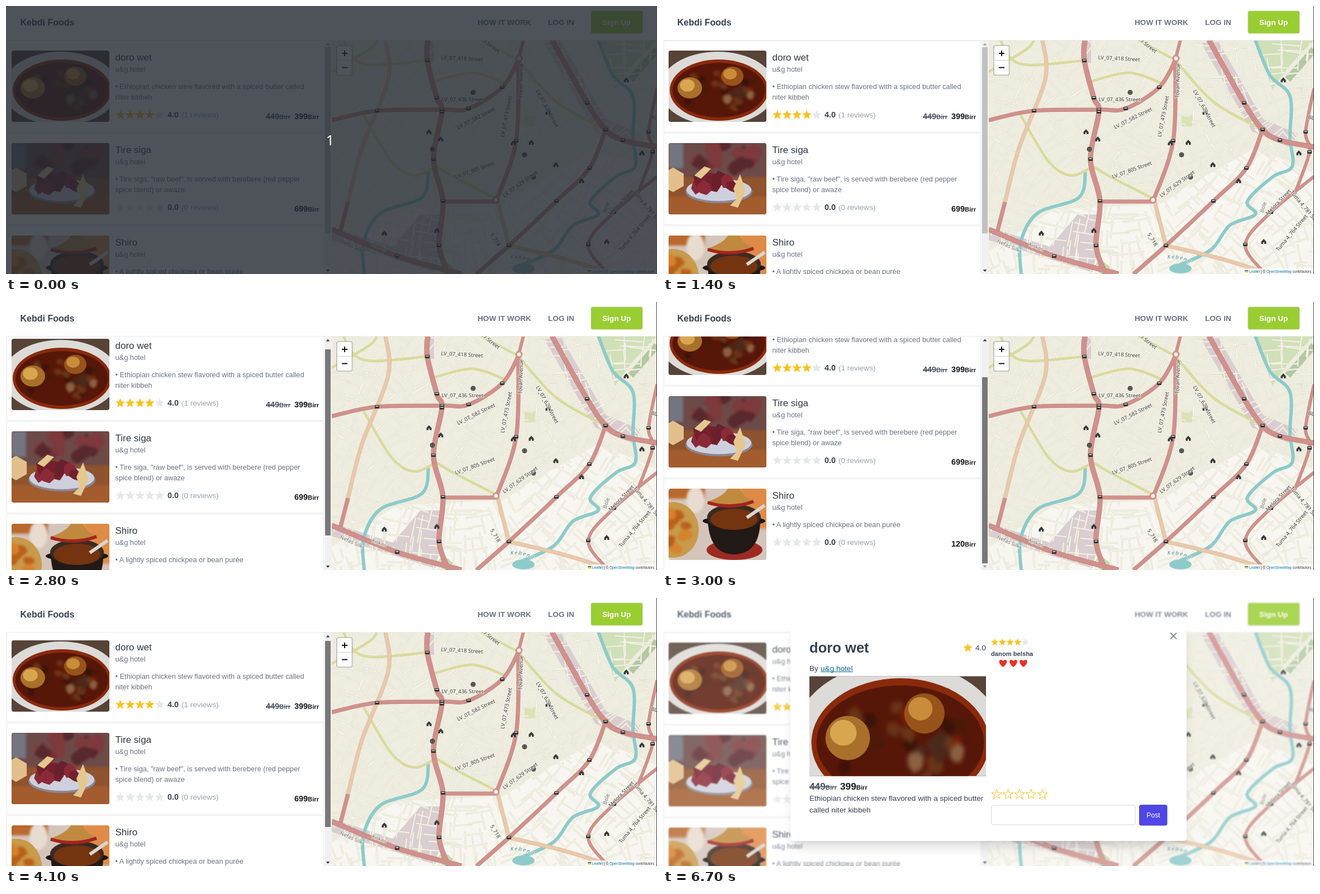
These frames come from a looping animation (1165 px wide and 481 px high, 8 s). An HTML page:

```html
<!DOCTYPE html>
<html lang="en">
<head>
<meta charset="utf-8">
<title>Food finder</title>
<style>
  html, body { margin: 0; width: 100%; height: 100%; overflow: hidden; background: #fff; }
  #stage { position: relative; width: 1165px; height: 481px; overflow: hidden; }
  #stage > * { position: absolute; left: 0; top: 0; width: 1165px; height: 481px; }
  svg { display: block; font-family: "Liberation Sans", Arial, sans-serif; }
  .map text, #dim text { font-family: "Noto Sans", sans-serif; }
  .map .credit { font-family: "Liberation Sans", Arial, sans-serif; }
  .soft { filter: blur(2px); }
  .raised { filter: drop-shadow(0 0 1.5px rgba(0, 0, 0, .2)); }
  #veil { background: rgba(255, 255, 255, .17); backdrop-filter: blur(1px); }
  #dim { background: rgba(34, 40, 49, .8); }
  #stage > #edge { left: 1164px; width: 1px; background: #45464a; }
  #stage > #panel { left: 228px; top: 45px; width: 709px; height: 391px; border-radius: 6px;
    background: #fff; box-shadow: 0 16px 20px -4px rgba(0, 0, 0, .12), 0 6px 8px -4px rgba(0, 0, 0, .08); }
</style>
</head>
<body>
<div id="stage"></div>
<script>
const LOOP = 8000;
const GOLD = '#fbc21c', PALE = '#e5e7e8', INK = '#374151', GREY = '#6b7280';
const FIVE = [0, 1, 2, 3, 4];

let seed = 11;
const rnd = () => (seed = (seed * 16807) % 2147483647) / 2147483647;
const pick = list => list[Math.floor(rnd() * list.length)];

const text = (x, y, size, str, fill, more = '') =>
  `<text x="${x}" y="${y}" font-size="${size}" fill="${fill}" ${more}>${str}</text>`;
const bold = (x, y, size, str, fill, more = '') =>
  text(x, y, size, str, fill, 'font-weight="700" ' + more);
const rect = (x, y, w, h, fill, more = '') =>
  `<rect x="${x}" y="${y}" width="${w}" height="${h}" fill="${fill}" ${more}/>`;
const oval = (x, y, rx, ry, fill, more = '') =>
  `<ellipse cx="${x}" cy="${y}" rx="${rx}" ry="${ry}" fill="${fill}" ${more}/>`;
const shape = (d, fill, more = '') => `<path d="${d}" fill="${fill}" ${more}/>`;
const line = (d, color, w, more = '') =>
  `<path d="${d}" fill="none" stroke="${color}" stroke-width="${w}" ${more}/>`;
const svg = (body, more = '') => `<svg viewBox="0 0 1165 481" ${more}>${body}</svg>`;
const clip = (id, x, y, w, h, r = 0) =>
  `<clipPath id="${id}"><rect x="${x}" y="${y}" width="${w}" height="${h}" rx="${r}"/></clipPath>`;

// A ring of corners; odd ones lie at r * dip, all may wobble
function ring(x, y, r, corners, fill, { dip = 1, wobble = 0, more = '' } = {}) {
  const pts = Array.from({ length: corners }, (_, k) => {
    const a = k * 2 * Math.PI / corners, q = r * (k % 2 ? dip : 1) * (1 - wobble * rnd());
    return `${(x + q * Math.sin(a)).toFixed(1)},${(y - q * Math.cos(a)).toFixed(1)}`;
  });
  return `<polygon points="${pts.join(' ')}" fill="${fill}" ${more}/>`;
}
const star = (x, y, r, fill, more) => ring(x, y + r * .06, r, 10, fill, { dip: .43, more });
const stars = (x, y, r, step, full) =>
  FIVE.map(i => star(x + i * step, y, r, i < full ? GOLD : PALE)).join('');
const birr = n => `${n}<tspan font-size="11.2">Birr</tspan>`;

// Photographs, drawn in a 175 x 128 box
function chunks(n, x, y, rx, ry, size, colors) {
  let out = '';
  while (n--) {
    const a = rnd() * 2 * Math.PI, q = Math.sqrt(rnd());
    out += ring(x + rx * q * Math.cos(a), y + ry * q * Math.sin(a), size * (.6 + rnd() * .4), 7, pick(colors), { wobble: .5 });
  }
  return out;
}
const soft = body => `<g class="soft">${body}</g>`;
const egg = (x, y, r, dark, light) =>
  oval(x, y, r, r * .86, dark) + oval(x - r * .2, y - r * .2, r * .6, r * .5, light);

const stew = rect(0, 0, 175, 128, '#574338') + oval(88, 68, 104, 66, '#dcdbd8') +
  oval(90, 71, 88, 55, '#8a2a0c') + oval(90, 71, 83, 49, '#571708') +
  soft(chunks(26, 88, 72, 68, 36, 12, ['#7c1f08', '#3a1309', '#6a3418', '#4a1a08']) +
    chunks(9, 126, 82, 26, 14, 12, ['#64402a', '#8b6142', '#4b2a1c'])) +
  egg(38, 67, 22, '#a8702a', '#d9a650') + egg(114, 46, 20, '#96541a', '#c98c3a');
const beef = rect(0, 0, 175, 128, '#8f532d') +
  soft(rect(0, -5, 175, 66, '#6c4a48') + rect(0, 0, 26, 46, '#737681') +
    chunks(16, 98, 24, 72, 24, 22, ['#57282c', '#743035', '#7d393c']) + rect(-5, 96, 185, 40, '#a25c2e')) +
  oval(90, 87, 60, 21, '#8b8796') + oval(90, 84, 58, 20, '#cfd0dd') +
  ring(8, 66, 22, 6, '#e3bf8d') +
  chunks(10, 86, 74, 36, 12, 19, ['#74202c', '#8a2a38', '#68202c']) +
  shape('M46,58 L64,42 L76,46 L58,64Z M116,82 L128,56 L138,86 L124,116 L110,112 L122,100Z', '#e4c88f');
const pot = rect(0, 0, 175, 128, '#d4c5bb') + soft(rect(128, -5, 52, 77, '#df8b48') + rect(-5, -5, 70, 23, '#b9682e') +
  oval(48, 20, 16, 24, '#e8dcd0')) +
  oval(8, 74, 46, 50, '#c99a4c') + soft(chunks(18, 6, 74, 30, 36, 15, ['#a95715', '#d5822c', '#b8601a'])) +
  oval(118, 110, 50, 18, '#9c2b22') + oval(117, 58, 56, 9, '#1c1613') +
  shape('M70,54 Q72,118 118,118 Q166,116 164,50Z', '#211916') +
  oval(117, 51, 48, 23, '#3a2a22') + oval(117, 55, 42, 19, '#73340f') +
  shape('M68,24 Q98,14 106,0 H128 Q134,16 154,22 Q112,38 68,24Z', '#c08a3e') +
  line('M70,25 Q112,38 152,23', '#a3241d', 6) + line('M140,52 L172,30', '#d9d6d2', 6);

function card(i, name, info, score, count, price, old, pic) {
  const up = info.length > 1 ? 0 : 19;
  return `<g transform="translate(0 ${166 * i})">` +
    rect(1.5, 62.5, 567, 164, '#fff', `id="card${i}" stroke="#e8e9ea"`) +
    `<g transform="translate(10 80)" clip-path="url(#pic)">${pic}</g>` +
    text(195.5, 98, 17, name, '#2f3642') + text(195.5, 118, 12.8, 'u&amp;g hotel', GREY) +
    info.map((s, k) => text(195.5, 148.5 + 19.2 * k, 12.8, s, GREY)).join('') +
    stars(204.5, 195 - up, 9, 17.6, score) +
    bold(289, 200 - up, 14.4, score + '.0', INK) +
    text(314, 200 - up, 13.6, `(${count} reviews)`, '#9aa3a8') +
    bold(560, 203 - up, 14.4, birr(price), '#17191c', 'text-anchor="end"') +
    (old ? bold(509, 203, 14.4, birr(old), '#4b5563', 'text-anchor="end"') + rect(465, 198, 44, 1, '#4b5563') : '') +
    '</g>';
}
const list = '<g clip-path="url(#left)"><g id="list">' +
  card(0, 'doro wet', ['• Ethiopian chicken stew flavored with a spiced butter called', 'niter kibbeh'], 4, 1, 399, 449, stew) +
  card(1, 'Tire siga', ['• Tire siga, "raw beef", is served with berebere (red pepper', 'spice blend) or awaze'], 0, 0, 699, 0, beef) +
  card(2, 'Shiro', ['• A lightly spiced chickpea or bean purée'], 0, 0, 120, 0, pot) + '</g></g>';

const bar = rect(570, 61, 13, 420, '#f1f1f1') +
  shape('M572.5,70.5 l3.5,-4 l3.5,4Z', '#505050', 'id="up"') +
  shape('M572.5,473 l3.5,4 l3.5,-4Z', '#505050', 'id="down"') +
  rect(571, 74, 10, 334, '#c1c1c1', 'id="thumb"');

const header = rect(0, 0, 1165, 61, '#fff') + rect(0, 61, 1165, 1, '#e9eaec') +
  bold(25.5, 34.5, 16, 'Kebdi Foods', INK) +
  bold(844, 33.5, 13.6, 'HOW IT WORK', GREY) + bold(970, 33.5, 13.6, 'LOG IN', GREY) +
  rect(1047, 9, 92, 40, '#9acd32', 'rx="3" class="raised"') + bold(1067, 33.5, 13.6, 'Sign Up', '#fff');

// Map: smooth curves through a few key points
function curve(str) {
  const p = str.split(' ').map(s => s.split(',').map(Number));
  let d = 'M' + p[0];
  for (let i = 0; i < p.length - 1; i++) {
    const a = p[i - 1] || p[i], b = p[i], c = p[i + 1], e = p[i + 2] || c;
    d += `C${b[0] + (c[0] - a[0]) / 6},${b[1] + (c[1] - a[1]) / 6} ` +
      `${c[0] - (e[0] - b[0]) / 6},${c[1] - (e[1] - b[1]) / 6} ${c}`;
  }
  return d;
}
function road(color, edge, w, routes) {
  const d = routes.map(curve).join('');
  return line(d, edge, w + 1.2) + line(d, color, w);
}

// Short lanes that follow a slowly turning field
function lanes() {
  let d = '';
  for (let y = 66; y < 490; y += 19)
    for (let x = 588; x < 1170; x += 19) {
      const turn = Math.sin(x / 95) * .6 + Math.cos(y / 80 + x / 200) * .5;
      const a = turn + pick([0, Math.PI / 2]), len = 10 + rnd() * 17;
      const dx = Math.cos(a) * len, dy = Math.sin(a) * len;
      const px = x + rnd() * 16 - 8, py = y + rnd() * 16 - 8;
      d += `M${(px - dx).toFixed(1)},${(py - dy).toFixed(1)}l${(2 * dx).toFixed(1)},${(2 * dy).toFixed(1)}`;
    }
  return line(d, '#ddd9c6', 2.8) + line(d, '#f6f5ea', 1.6);
}

const land = rect(583, 61, 582, 420, '#eeeddf') +
  shape('M583,440 L700,365 L880,356 L1060,255 L1165,300 V481 H583Z', '#f7f6f0') +
  shape('M1062,61 H1165 L1122,106 L1090,150Z', '#d0e0b8') +
  line('M1165,78 L1118,132', '#b2c9a2', 12) + line('M776,462 L800,481', '#c5d9a7', 20) +
  rect(928, 196, 19, 20, '#dbe3b4') +
  shape('M742,374 H776 L778,440 L768,478 L583,420 V396 L692,432Z', '#d9ced1') +
  line('M976,61 L1064,214 L1130,242', '#dacdd1', 28) + line('M757,61 V102', '#dacdd1', 18);

const water = line([
  '756,298 744,344 670,372 640,424 641,481',
  '1060,61 1086,124 1122,162 1122,236 1126,288 1092,306 1046,350 1060,374 1014,394 980,438 916,468'
].map(curve).join(''), '#8ccbc9', 6) + oval(926, 471, 20, 9, '#8ccbc9');

const RED = '#d0918c';
const minor = ['583,118 650,78 664,61', '603,61 640,104 752,98', '764,136 834,120 896,140', '917,97 850,61',
  '917,97 985,172 1073,222', '640,196 690,279 730,304 766,290', '768,287 800,306 878,346'];
const pale = ['612,352 637,255 684,132 679,61', '880,352 900,430', '900,430 1000,454 1085,481'];
const thin = ['1165,306 1088,370 1042,428 1078,481', '1165,148 1150,226 1157,262 1130,338', '926,61 918,92'];
const main = ['583,205 664,188 780,186 828,184 888,146 917,97', '917,97 913,242 878,348', '876,351 782,351',
  '1073,222 1044,291 985,350 900,430 842,481', '612,352 597,410'];
const wide = ['755,61 754,98 771,165 780,190 765,275 782,350 775,430 792,481',
  '977,61 1040,174 1073,222 1104,241 1165,253', '583,401 700,449 815,481'];
const knot = (x, y, r) => oval(x, y, r, r, '#f4f1e8', `stroke="${RED}" stroke-width="3"`);
const streets = road('#dbdd9a', '#cfd08e', 3, minor) + road('#e8c9ab', '#dbb897', 6, pale) +
  road(RED, '#bd7d79', 4.5, thin) + road(RED, '#bd7d79', 6, main) + road(RED, '#b97a77', 8, wide) +
  knot(918, 94, 5) + knot(877, 348, 5) + oval(1073, 223, 7, 7, RED);

// Stops stand at the bends of the big roads, other marks anywhere
const put = (places, body) => places.map(p => `<g transform="translate(${p})">${body}</g>`).join('');
const bends = [...main, ...wide, ...thin].flatMap(r => r.split(' ').slice(1, -1));
const spots = n => Array.from({ length: n }, () => `${Math.round(640 + rnd() * 500)},${Math.round(130 + rnd() * 320)}`);
const icons = put(bends, rect(-4, -3, 8, 6, '#333', 'rx="1"') + rect(-2.6, -1.8, 5.2, 1.6, '#e6e4da')) +
  put(spots(12), shape('M-4.5,4 V0 L0,-5 L4.5,0 V4 H1 V1 H-1 V4Z', '#3a3a3a')) +
  put(spots(4), oval(0, 0, 4, 4, '#777', 'stroke="#333"') + line('M-4,0H4M0,-4V4', '#333', 1));

const halo = 'stroke="#f6f5ec" stroke-width="2" stroke-opacity=".8" paint-order="stroke"';
const label = (x, y, turn, str, fill = '#3b3b3b') => text(0, 3.4, 9.5, str, fill,
  `text-anchor="middle" transform="translate(${x} ${y}) rotate(${turn})" ${halo}`);
const labels = label(816, 94, 3, 'LV_07_418 Street') + label(817, 168, 0, 'LV_07_436 Street') +
  label(841, 201, -27, 'LV_07_582 Street') + label(895, 198, -79, 'LV_07_473 Street') +
  label(969, 184, 62, 'LV_07_629 Street') + label(839, 294, -20, 'LV_07_805 Street') +
  label(920, 319, -36, 'LV_07_629 Street') + label(921, 134, -88, 'Tovan Avenue') +
  label(867, 70, 38, '47 Street') + label(1101, 352, -46, 'Melora Street') +
  label(1151, 364, 50, 'Tuma 4_781 Street') + label(1125, 407, -50, 'Tuma 4_764 Street') +
  label(876, 419, 58, '5_718') + label(1160, 200, 10, 'BL') + label(1074, 361, -72, 'Bole', '#75777a') +
  label(618, 430, 24, 'Nefas Silk', '#75777a') + label(668, 432, 22, 'Kirkos', '#75777a') +
  '<path id="bend" d="M903,454 Q926,450 950,466" fill="none"/>' +
  text(0, 0, 9.5, '<textPath href="#bend">Kebena</textPath>', '#4a8fa0', `font-style="italic" letter-spacing="2" ${halo}`);

const link = s => `<tspan fill="#0078a8">${s}</tspan>`;
const controls = rect(592, 71, 27.5, 53, '#fff', 'rx="3" stroke="#000" stroke-opacity=".25" stroke-width="1.6"') +
  rect(593, 97, 26, 1, '#ccc') + line('M601,85H611M606,80V90M601,110.5H611', '#111', 2) +
  rect(1039, 471, 126, 10, '#fff', 'opacity=".8"') +
  rect(1041, 474, 6.5, 2.2, '#4c7be1') + rect(1041, 476.2, 6.5, 2.2, '#ffd500') +
  text(1049, 478.6, 6.4, `${link('Leaflet')} | © ${link('OpenStreetMap')} contributors`, '#333', 'class="credit"');

const map = '<g class="map" clip-path="url(#right)">' +
  land + lanes() + water + streets + icons + labels + controls + '</g>';

// Dish window
const heart = x => shape(`M${x},124 C${x - 11},116 ${x - 7},107 ${x},113 C${x + 7},107 ${x + 11},116 ${x},124Z`, '#e8302a');
const dish = bold(262, 98, 25.6, 'doro wet', INK) + star(545.5, 89, 8.6, GOLD) + text(559, 94, 13.6, '4.0', INK) +
  text(262, 130.5, 13.6, 'By', INK) + text(282, 130.5, 13.6, 'u&amp;g hotel', '#0b699b') + rect(282, 132, 58, 1, '#0b699b') +
  stars(593.8, 79, 7, 13.6, 4) + bold(587, 104, 11.2, 'danom belsha', INK) + [608.5, 627, 645].map(heart).join('') +
  `<g clip-path="url(#photo)"><g transform="translate(262 110.5) scale(1.806 2.1)">${stew}</g></g>` +
  bold(262, 344, 17.3, birr(449), '#4b5563') + rect(262, 338, 49, 1.3, '#4b5563') + bold(317, 344, 17.3, birr(399), '#17191c') +
  text(262, 364, 13.6, 'Ethiopian chicken stew flavored with a spiced butter', INK) +
  text(262, 384.5, 13.6, 'called niter kibbeh', INK) +
  FIVE.map(i => star(597 + 20.5 * i, 352, 9, '#fff', 'stroke="#f3cb3c" stroke-width="1.1"')).join('') +
  rect(587.5, 372, 257.5, 35, '#fff', 'rx="4" stroke="#d1d5db"') +
  rect(852, 371, 50.5, 37.5, '#4f46e5', 'rx="4"') + text(865.3, 394, 12.2, 'Post', '#fff') +
  line('M908,62.5l11,11m0,-11l-11,11', '#5b626d', 1.3);

const clips = clip('left', 0, 61, 570, 420) + clip('right', 583, 61, 582, 420) +
  clip('pic', 0, 0, 175, 128, 4) + clip('photo', 262, 140.5, 316, 179);
document.getElementById('stage').innerHTML =
  svg(clips + rect(0, 0, 1165, 481, '#fff') + list + bar + map + header) +
  '<div id="veil"></div><div id="panel"></div>' + svg(dish, 'id="dish"') +
  `<div id="dim">${svg(text(580, 250, 25, '1', '#fff', 'text-anchor="middle"'))}</div><div id="edge"></div>`;

// Each step: [start in ms, value]
function play(id, prop, steps) {
  const frames = steps.map(([t, v]) => ({ offset: t / LOOP, [prop]: v, easing: 'step-end' }));
  frames.push({ offset: 1, [prop]: steps[steps.length - 1][1] });
  document.getElementById(id).animate(frames, { duration: LOOP, iterations: Infinity });
}

// The list is dragged to its end and back, redrawn every 100 ms
const part = (t, from, span) => Math.min(1, Math.max(0, (t - from) / span));
const scroll = t => 77 * (t < 3800 ? part(t, 2700, 300) ** 1.55 : (1 - part(t, 3800, 400)) ** 2.1);
const shift = k => Array.from({ length: LOOP / 100 }, (_, i) =>
  [i * 100, `translate(0px, ${Math.round(scroll(i * 100) * k)}px)`]);
play('list', 'transform', shift(-1));
play('thumb', 'transform', shift(.79));

const REST = '#c1c1c1', HOVER = '#a8a8a8', HELD = '#787878';
play('thumb', 'fill', [[0, REST], [600, HOVER], [1400, REST], [2100, HOVER], [2600, HELD], [4600, HOVER], [4900, REST]]);
play('up', 'fill', [[0, '#a3a3a3'], [2800, '#404040'], [4200, '#a3a3a3']]);
play('down', 'fill', [[0, '#404040'], [3000, '#a3a3a3'], [3900, '#404040']]);
play('card0', 'fill', [[0, '#fff'], [4900, '#fcfdfd'], [5000, '#f8faf9'], [6700, '#fff']]);
play('dim', 'visibility', [[0, 'visible'], [100, 'hidden']]);
for (const id of ['veil', 'panel', 'dish'])
  play(id, 'visibility', [[0, 'hidden'], [6700, 'visible']]);
</script>
</body>
</html>
```
